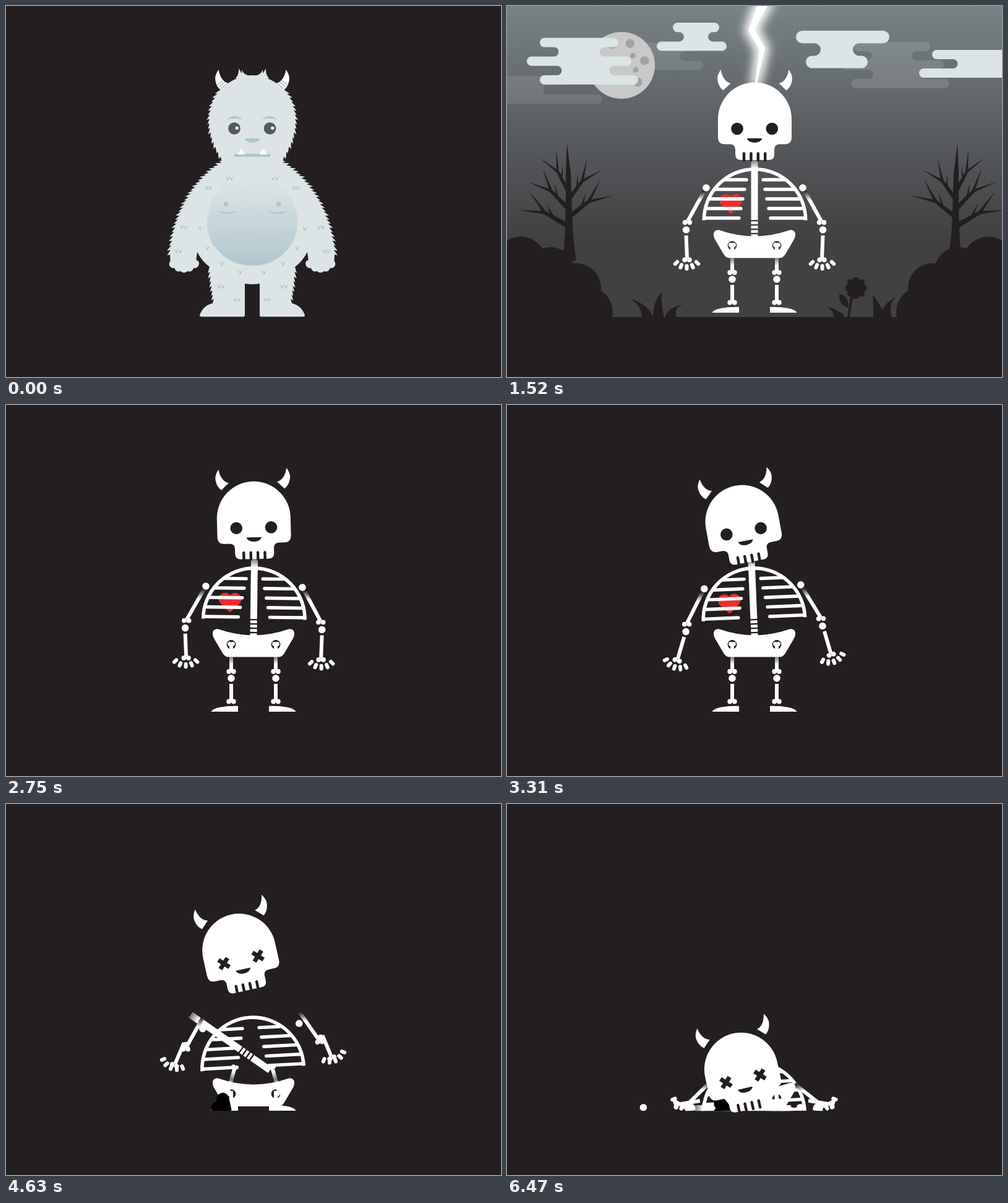
An HTML page that plays this animation: 800 px wide and 600 px high, repeating every 7.47 s.

```html
<!DOCTYPE html>
<html lang="en">
<head>
<meta charset="utf-8">
<title>Struck</title>
<style>
html, body { margin: 0; width: 100%; height: 100%; overflow: hidden; background: #231f20; }
svg { display: block; width: 100vw; height: 100vh; }
</style>
</head>
<body>
<svg id="stage" viewBox="0 0 800 600"></svg>
<script>
const LOOP = 7470, FLOOR = 496.3, GRAVITY = 5.6e-4;
const DARK = '#231f20', FUR = '#dce4e5', TINT = '#aec6cd', WHITE = '#fff';

// ---------- drawing helpers ----------
const path = (d, fill, extra = '') => `<path d="${d}" fill="${fill}" ${extra}/>`;
const dot = (x, y, r, fill = WHITE) => `<circle cx="${x}" cy="${y}" r="${r}" fill="${fill}"/>`;
const line = (x1, y1, x2, y2, w, color = WHITE, cap = 'round') =>
  `<path d="M${x1} ${y1}L${x2} ${y2}" stroke="${color}" stroke-width="${w}" stroke-linecap="${cap}" fill="none"/>`;
const bone = (x1, y1, x2, y2, color = WHITE) => line(x1, y1, x2, y2, 6, color, 'butt');
const group = (id, body) => `<g id="${id}">${body}</g>`;
const mirror = (body, width) => `<g transform="matrix(-1 0 0 1 ${width} 0)">${body}</g>`;
const both = (body, width) => body + mirror(body, width);
const repeat = (n, fn) => Array.from({ length: n }, (_, i) => fn(i)).join('');
const fade = (id, y1, y2, stops) =>
  `<linearGradient id="${id}" gradientUnits="userSpaceOnUse" x1="0" x2="0" y1="${y1}" y2="${y2}">` +
  stops.map(([o, c]) => `<stop offset="${o}" stop-color="${c}"/>`).join('') + '</linearGradient>';

// Saw-tooth fur along a quadratic curve; tips hang outward and along it.
function fur(a, c, b, n, len) {
  const at = u => [0, 1].map(k => a[k] * (1 - u) ** 2 + 2 * c[k] * u * (1 - u) + b[k] * u * u);
  return repeat(n, i => {
    const p = at(i / n), q = at((i + 1) / n);
    const dx = q[0] - p[0], dy = q[1] - p[1], l = len * (0.85 + 0.2 * Math.sin(i * 2.3)) / Math.hypot(dx, dy);
    const tip = [q[0] + (0.4 * dx - dy) * l, q[1] + (0.4 * dy + dx) * l];
    return `L${tip[0].toFixed(1)} ${tip[1].toFixed(1)}L${q[0].toFixed(1)} ${q[1].toFixed(1)}`;
  });
}

// Stacked pills; each neck fills the middle of the overlap and has hollow round sides.
function cloud(y, h, rows, fill = FUR, alpha = 1) {
  const r = h / 2, arc = s => `a${r} ${r} 0 0 ${s} 0 `;
  const necks = rows.slice(1).map((row, i) => {
    const l = Math.max(row[0], rows[i][0]), e = Math.min(row[1], rows[i][1]), inset = 0.24 * (e - l);
    return [l + inset, e - inset];
  });
  let d = `M${rows[0][0] + r} ${y}`;
  rows.forEach((row, i) => {
    d += `H${row[1] - r}${arc(1)}${h}`;
    if (necks[i]) d += `H${necks[i][1] + r}${arc(0)}${h}`;
  });
  for (let i = rows.length - 1; i >= 0; i--) {
    d += `H${rows[i][0] + r}${arc(1)}${-h}`;
    if (i) d += `H${necks[i - 1][0] - r}${arc(0)}${-h}`;
  }
  return path(d + 'Z', fill, `opacity="${alpha}"`);
}

// ---------- night scene ----------
// Tapered branch that forks until it is thin; angle is measured from straight up.
function limb(x, y, angle, len, w, forks) {
  const s = Math.sin(angle), c = Math.cos(angle), e = forks ? w * 0.3 : 0.2;
  const x2 = x + s * len, y2 = y - c * len, h = w / 2;
  const out = path(`M${x - c * h} ${y - s * h}L${x2 - c * e} ${y2 - s * e}L${x2 + c * e} ${y2 + s * e}L${x + c * h} ${y + s * h}Z`, DARK);
  if (!forks) return out;
  return out + [-0.42, 0.42].map(turn => limb(x + s * len * 0.93, y - c * len * 0.93, angle + turn, len * 0.85, w * 0.62, 0)).join('') +
    limb(x + s * len * 0.6, y - c * len * 0.6, angle - 0.6 * Math.sign(angle), len * 0.5, w * 0.5, 0);
}

function scene() {
  const tree = path('M90 410C95 370 95 330 95 270L97 222L103 270L105 330C106 370 109 390 112 412Z', DARK) +
    repeat(5, i => limb(99, 356 - i * 14, (i % 2 ? 1 : -1) * (1.05 - i * 0.14), 47 - i * 2, 9 - i * 0.6, 1));
  const bush = dot(22, 415, 42, DARK) + dot(70, 430, 40, DARK) + dot(112, 456, 40, DARK) + dot(130, 495, 41, DARK) +
    path('M0 420H80L130 470V503H0Z', DARK);
  const flower = repeat(8, i => dot(564 + 12.5 * Math.cos(i * Math.PI / 4), 456 + 12.5 * Math.sin(i * Math.PI / 4), 5.3, DARK)) +
    dot(564, 456, 12, DARK) + line(552, 503, 558, 466, 4, DARK) + path('M552 488Q536 484 537 466Q552 468 552 488Z', DARK);
  const blade = (x, lean, h) =>
    path(`M${x} 503Q${x} ${503 - h * 0.6} ${x + lean} ${503 - h}Q${x + 12} ${503 - h * 0.6} ${x + 18} 503Z`, DARK);
  const grass = blade(218, -20, 31) + blade(236, 14, 40) + blade(256, 28, 21) +
    blade(528, -11, 17) + blade(592, -1, 36) + blade(604, 24, 32);
  const crater = i => {
    const a = i * 0.5 - 1.2, d = i % 2 ? 24 : 38;
    return dot(185 + d * Math.cos(a), 96 + d * Math.sin(a), i % 2 ? 4.5 : 7.3, '#a2a3a5');
  };
  const bolt = 'M404 0L390 40L408 70L401 124H404L417 68L400 38L421 0Z';
  return `<rect width="800" height="503" fill="url(#sky)"/>` +
    cloud(113, 15, [[-60, 96], [-60, 154]], WHITE, 0.1) +
    cloud(59, 15, [[190, 302], [205, 317]], WHITE, 0.1) +
    cloud(58, 15, [[560, 684], [540, 706], [556, 715]], WHITE, 0.13) +
    dot(185, 96, 54, '#c9c9ca') + repeat(5, crater) + dot(170, 60, 9, '#a2a3a5') +
    cloud(51.5, 15.1, [[53, 180], [32, 201], [53, 212]]) + cloud(27, 15.2, [[268, 343], [242, 355]]) +
    cloud(40, 20.2, [[467, 618], [483, 583]]) + cloud(71, 15, [[687, 860], [666, 860]]) +
    both(tree, 825) + both(bush, 800) + grass + flower +
    path(bolt, WHITE, 'filter="url(#glow)" stroke="#fff" stroke-width="14"') + path(bolt, WHITE);
}

// ---------- yeti ----------
const HORN = 'M343.5 103Q337 112 338.3 120Q340 131 347.5 136.5L359.5 125Q347 122 343.5 103Z';

function yeti() {
  const half = 'M398.5 245L354 250' + fur([354, 250], [277, 298], [265, 402], 27, 5.5) + 'L266 420L306 421L309 398Q317 413 329 422' +
    fur([329, 422], [332, 455], [337, 480], 8, 4.5) + 'Q319 483 313 500Q313 502.5 316 502.5H384Q386 502.5 386 500V449Q392 450 398.5 450Z';
  const paw = dot(307, 416, 5, '#c3c9ca') + path(half, FUR) +
    repeat(5, i => dot(270.5 + 8.6 * i, 424.5 - 1.8 * (i - 2) ** 2, 6.8, FUR));
  const belly = 'M398.5 271Q370 273 352 289' + fur([352, 289], [309, 341], [337, 388], 20, 2.6) + 'Q359 420 398.5 420Z';

  const tuft = (x, y) => path(`M${x - 4} ${y - 4}L${x + 0.5} ${y + 4}L${x + 4} ${y - 4}L${x + 0.3} ${y}Z`, TINT);
  const ring = repeat(4, i => {
    const a = 1.8 + i * 0.39;
    return tuft(398 + 86 * Math.cos(a), 345 + 88 * Math.sin(a));
  });
  const pairs = [[327, 294], [361, 279], [287, 358], [278, 397], [347, 454], [373, 475]]
    .map(([x, y]) => tuft(x - 3, y) + tuft(x + 3, y)).join('');
  const chest = dot(355.5, 320.5, 3.8, TINT) + path('M338 330Q355 337 374 331Q356 342 338 330Z', TINT);
  const body = both(paw, 796) + both(path(belly, 'url(#belly)'), 796) + both(ring + pairs + chest, 796);

  const skull = 'M398.5 112Q368 113 346 136' + fur([346, 136], [309, 186], [352, 252], 16, 4.5) + 'L398.5 260Z';
  const horn = path(HORN, WHITE) + repeat(3, i => line(342 + 2.4 * i, 127 + 3.5 * i, 350 + 3.5 * i, 120.5 + 2.5 * i, 1.8, TINT, 'butt'));
  const hair = 'M371 117Q377 110 376 101L381 109L381 103Q384 111 392 112.5H404Q412 111 415 103L415 109L420 101Q419 110 425 117Z';
  const face = path('M357 184Q369 172.5 382 183.5Q369 180 357 184Z', TINT) + path('M374 240L380 230.5L386.5 240Z', WHITE);
  const eye = x => dot(x, 198, 9.8, '#58595b') + dot(x + 4.2, 197.3, 2.6);
  return body + group('yetiHead', both(horn, 796) + both(path(skull, FUR), 796) + path(hair, FUR) +
    line(371, 241.5, 425, 241.5, 5, TINT) + both(face, 796) + eye(369) + eye(426.5) +
    path('M385.5 214H410.5Q408 221 398 221Q388 221 385.5 214Z', TINT));
}

// ---------- skeleton ----------
const HEART = 'M0 18L-16 3A10.2 10.2 0 1 1 0 -10A10.2 10.2 0 1 1 16 3Z';

function skeleton() {
  const pair = (id, body) => group(id + 'L', body) + group(id + 'R', mirror(body, 800));
  const knobs = (x, y) => dot(x - 3.8, y, 3.9) + dot(x + 3.8, y, 3.9);

  const legs = pair('thigh', bone(364, 386, 364, 430, 'url(#hipFade)') + dot(361.5, 386.5, 3.4) + dot(366.5, 386.5, 3.4) + knobs(364, 431)) +
    pair('knee', dot(364, 442, 5.8)) + pair('shin', bone(364, 451, 364, 478) + knobs(364, 479.5));
  const feet = both(path('M331.5 496C334 490 350 486.6 375 486.8V496Z', WHITE), 800);

  const fingers = repeat(5, i => `<g transform="rotate(${23 * (i - 2)} 290.5 399)">${line(290.5, 420.3, 290.5, 425, 6)}</g>`);
  const arms = pair('upper', bone(319, 299, 292, 348, 'url(#armFade)') + knobs(291.5, 350)) +
    pair('elbow', dot(289.5, 362, 5.8)) + pair('fore', bone(289.5, 371, 291, 408) + knobs(291, 410.5)) +
    pair('hand', fingers) + pair('ball', dot(322, 294, 5.8));

  const bars = repeat(5, i => {
    const y = 281 + 15.5 * i;
    return line(400.5 - Math.sqrt(82 ** 2 - (346.5 - y) ** 2), y, 387 - 3 * i, y, 5.4);
  });
  const ribs = '<path d="M318.3 346.5A82 82.5 0 0 1 482.7 346.5" fill="none" stroke="#fff" stroke-width="5.6"/>' + both(bars, 801);
  const disc = (y, h) => `<rect x="394.5" y="${y}" width="11" height="${h}" fill="url(#neckFade)"/>`;
  const spine = disc(248, 98) + repeat(3, i => disc(348.3 + 7 * i, 4.6)) + disc(369.3, 35);

  const hole = x => `M${x - 7.4} 387.5a7.4 7.4 0 1 0 14.8 0a7.4 7.4 0 1 0 -14.8 0Z`;
  const pelvis = path('M344 362.8Q400 382 456 362.8C466 360 469 370 463 379L449.5 402Q446 407.6 440 407.6H360' +
    'Q354 407.6 350.5 402L337 379C331 370 334 360 344 362.8Z' + hole(364) + hole(436), WHITE, 'fill-rule="evenodd"');

  const skull = 'M341 183A59.5 59.5 0 0 1 460 183V212Q460 223.5 449 223.5H440Q432 224 432 232V240Q432 249 423 249H378' +
    'Q369 249 369 240V232Q369 224 361 223.5H352Q341 223.5 341 212Z';
  const cross = x => line(x - 7.5, 191, x + 7.5, 206, 7, DARK, 'butt') + line(x - 7.5, 206, x + 7.5, 191, 7, DARK, 'butt');
  const teeth = repeat(4, i => line(383 + 11.4 * i, 238.5, 383 + 11.4 * i, 249.5, 4.4, DARK));
  const head = both(`<g transform="translate(2)">${path(HORN, WHITE)}</g>`, 801) + path(skull, WHITE) + teeth +
    path('M388 214H412.5Q410 221 400.3 221Q390 221 388 214Z', DARK) +
    group('open', dot(372, 198.5, 9.8, DARK) + dot(428.3, 198.5, 9.8, DARK)) + group('shut', cross(372) + cross(428.3));

  return '<g clip-path="url(#floor)">' + legs + feet + group('spine', spine) + path(HEART, '#ec2d30', 'id="heart"') +
    group('ribs', ribs) + arms + group('pelvis', pelvis) + path(HEART, '#000', 'id="fallen"') + '</g>' + group('head', head);
}

const stage = document.getElementById('stage');
stage.innerHTML = '<defs>' +
  fade('sky', 0, 503, [[0, '#788385'], [0.42, '#585b5e'], [0.75, '#414042']]) +
  fade('belly', 271, 420, [[0, FUR], [0.1, FUR], [1, '#b0c7ce']]) +
  fade('neckFade', 247, 263, [[0, '#666'], [1, WHITE]]) +
  fade('armFade', 299, 314, [[0, DARK], [1, WHITE]]) +
  fade('hipFade', 394, 420, [[0, WHITE], [0.5, '#777'], [1, WHITE]]) +
  '<filter id="glow" x="-150%" y="-20%" width="400%" height="140%"><feGaussianBlur stdDeviation="8"/></filter>' +
  `<clipPath id="floor"><rect width="800" height="${FLOOR}"/></clipPath></defs>` +
  `<rect width="800" height="600" fill="${DARK}"/>` +
  group('scene', scene()) + group('yeti', yeti()) + group('bones', skeleton());

const el = {};
stage.querySelectorAll('[id]').forEach(e => { el[e.id] = e; });

// ---------- motion ----------
const clamp = u => Math.max(0, Math.min(1, u));
const ramp = (t, start, length) => clamp((t - start) / length);
const smooth = u => u * u * (3 - 2 * u);
const show = (e, on) => e.setAttribute('display', on ? 'inline' : 'none');

// Eased value through [time, value] pairs.
function track(t, keys) {
  if (t <= keys[0][0]) return keys[0][1];
  for (let i = 1; i < keys.length; i++) {
    const [a, p] = keys[i - 1], [b, q] = keys[i];
    if (t < b) return p + (q - p) * smooth((t - a) / (b - a));
  }
  return keys[keys.length - 1][1];
}

// Loose parts fall from their own place to the floor.
const parts = [];
function addPart(id, start, opts = {}) {
  const p = { id, start, turn: 0, power: 1.5, slide: 0, arch: 0, roll: 0, leans: true, swing: 0, ...opts };
  const b = el[id].getBBox(), right = b.x + b.width;
  p.cx = b.x + b.width / 2;
  p.cy = b.y + b.height / 2;
  const tilt = p.leans ? (400 - right) * 0.054 : 0;
  const flat = b.height / 2 * (1 - Math.cos(p.turn * Math.PI / 180));
  p.drop = FLOOR - b.y - b.height - tilt + flat;
  parts.push(p);
}
addPart('pelvis', 4250, { leans: false });
addPart('ribs', 4250);
addPart('spine', 4305, { turn: -87, power: 0.5, slide: -17, arch: -32 });
for (const [key, side] of [['L', 1], ['R', -1]]) {
  ['thigh', 'knee', 'shin'].forEach((name, i) => addPart(name + key, 4370, { leans: false, turn: i ? 0 : 35 * side }));
  ['ball', 'upper', 'elbow', 'fore', 'hand'].forEach((name, i) => addPart(name + key, 4290 + 70 * i, {
    slide: 4 * i * side,
    turn: i % 2 ? 20 * i * side : 0,
    swing: i > 2 ? side : 0,
    roll: name + key === 'ballL' ? -97.5 : 0
  }));
}

function pose(t) {
  const sway = track(t, [[2590, 0], [2790, 0.8], [3510, -3.1]]);
  const lean = `rotate(${sway} 400 372)`;
  const reach = smooth(ramp(t, 2790, 720));
  const roll = 1 - (1 - ramp(t, 4830, 1640)) ** 1.75;

  for (const p of parts) {
    const f = clamp(GRAVITY * Math.max(0, t - p.start) ** 2 / p.drop);
    const x = p.slide * f + p.arch * Math.sin(Math.PI * f) + p.roll * roll;
    const elbow = p.swing ? `rotate(${23 * p.swing * reach - sway} ${400 - 110.5 * p.swing} 362)` : '';
    el[p.id].setAttribute('transform', `translate(${x} ${p.drop * f}) ${p.leans ? lean : ''} ${elbow} ` +
      `rotate(${p.turn * f ** p.power} ${p.cx} ${p.cy})`);
  }

  const nod = track(t, [[2590, 0], [2790, -2.4], [3510, -9.4]]);
  const h = ramp(t, 4200, 980);
  el.head.setAttribute('transform',
    `translate(${3 * h - 4 * reach} ${6 * reach + 238.5 * h * h}) ${lean} rotate(${nod} 400 250)`);
  show(el.open, t < 3670);
  show(el.shut, t >= 3670);

  const loose = t >= 3670;
  show(el.heart, !loose);
  show(el.fallen, loose);
  el.heart.setAttribute('transform', `${lean} translate(361.5 318)`);
  if (loose) {
    const land = ramp(t, 3670, 330), settle = smooth(ramp(t, 4250, 700));
    const bounce = 8 * Math.sin(Math.PI * ramp(t, 4000, 140));
    const y = 320 + 157 * land ** 2 - bounce + 16 * settle;
    const turn = -25 * smooth(ramp(t, 3670, 390)) - 60 * settle;
    const k = 1 - ramp(t, 3700, 560);
    el.fallen.setAttribute('transform', `translate(${358 - 6.5 * land - 4 * settle} ${y}) rotate(${turn})`);
    el.fallen.setAttribute('fill', `rgb(${[236, 45, 48].map(c => Math.round(c * k))})`);
  }
}

function draw(t) {
  const xray = (t >= 1520 && t < 1670) || t >= 1870;
  const night = xray ? 1 - ramp(t, 2070, 500) : 0;
  show(el.yeti, !xray);
  show(el.bones, xray);
  show(el.scene, night > 0);
  el.scene.setAttribute('opacity', night);
  el.yetiHead.setAttribute('transform', `rotate(${-8 * smooth(ramp(t, 160, 320))} 398 250)`);
  pose(t);
}

const begin = performance.now();
function tick() {
  draw((performance.now() - begin) % LOOP);
  requestAnimationFrame(tick);
}
tick();
</script>
</body>
</html>
```
